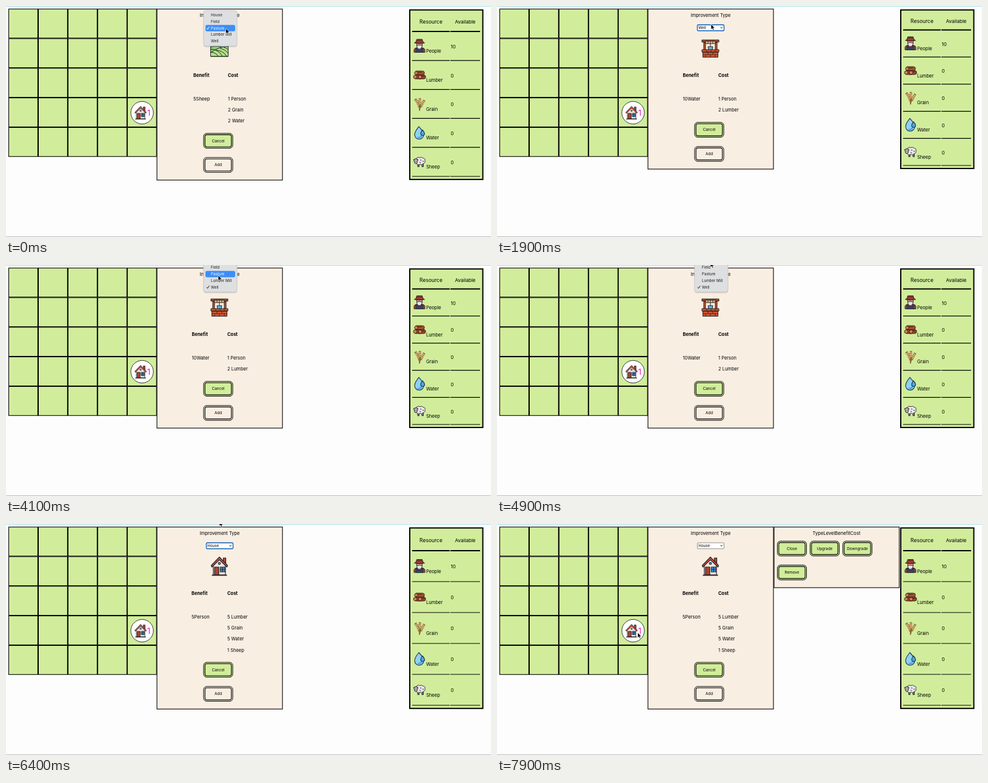
These frames come from a looping animation (800x381 px, 8000 ms). An HTML page:

```html
<!DOCTYPE html>
<html lang="en">
<head>
<meta charset="utf-8">
<title>Improvement picker</title>
<style>
  html, body { margin: 0; width: 100%; height: 100%; overflow: hidden; background: #fdfdfd; }
  svg { display: block; width: 100%; height: 100%; font-family: Inter, Roboto, sans-serif; }
</style>
</head>
<body>
<svg id="stage" viewBox="0 0 800 381">
  <defs>
    <g id="house" stroke="#23242c" stroke-width="1.200" stroke-linejoin="round">
      <path d="M6.500-14h4v10h-4z" fill="#b5483c"/>
      <path d="M-10 14V-2L0-12 10-2V14z" fill="#efe4dc"/>
      <path d="M-12.500 1-13.500-1.500 0-15.500 13.500-1.500 12.500 1 0-11z" fill="#d9503f"/>
      <path d="M-8 14V1h7V14z" fill="#a8452f"/>
      <path d="M1.500 1h7.500v8h-7.500zM5.200 1v8M1.500 5h7.500" fill="#3f9be0"/>
      <circle cy="-5" r="1.700" fill="#6bbdf0"/>
      <path d="M-12.500 14.500h25" stroke-width="1.800"/>
    </g>
    <g id="well" stroke="#2a2020" stroke-width="1" stroke-linejoin="round">
      <path d="M-11-10h3V4h-3zM8-10h3V4H8z" fill="#b5592f"/>
      <path d="M-14-14h28v3.500h-28z" fill="#a94b2b"/>
      <path d="M-8-12h16v4H-8z" fill="#efc88f"/>
      <path d="M-4-12v4M0-12V-2M4-12v4" fill="none"/>
      <path d="M-4-3h8L3 3h-6z" fill="#5fb3e6"/>
      <path d="M-14 2h28v4h-28zM-12.500 6h25v8.500h-25z" fill="#d4552f"/>
      <path d="M-12 10.200h24M-6 2v4M1 2v4M8 2v4M-4 6v4M4 6v4M-8 10v4M0 10v4M8 10v4" stroke-width=".8"/>
    </g>
    <g id="pasture" stroke="#1d2b1c" stroke-width="1" stroke-linejoin="round">
      <path d="M-14.500-13h29v26h-29z" fill="#bfe6f5"/>
      <path d="M-14.500-2Q-5-7 14.500 1V13h-29z" fill="#8fd07a"/>
      <path d="M-14.500 7Q0-4 14.500-3V13h-29z" fill="#b5e08a"/>
      <path d="M-14.500 1Q-1 2 5 13M-14.500 6Q-5 7-2 13M-6 3Q6 3 12 13M1 0Q9 1 14.500 8M7-2Q11-1 14.500 2" fill="none"/>
    </g>
    <g id="people" stroke="#26222a" stroke-width=".9" stroke-linejoin="round">
      <path d="M-9 10.500V6Q-8 3-4 3H4Q8 3 9 6V10.500z" fill="#b8403a"/>
      <path d="M-6 10.500V3.500h3V7h6V3.500h3v7z" fill="#33486e"/>
      <path d="M-4.500-5h9V0Q3 4 0 4T-4.500 0z" fill="#e9a88a"/>
      <path d="M-4.500-1Q0-2 4.500-1 4 4.500 0 5T-4.500-1z" fill="#e4e4ea"/>
      <path d="M-8.500-5Q-5-6-4.500-11H4.500Q5-6 8.500-5 0-2.500-8.500-5z" fill="#7a3328"/>
      <path d="M-4.500-6.800h9" stroke="#c4453c" stroke-width="1.300"/>
    </g>
    <g id="lumber" stroke="#3a2018" stroke-width=".9">
      <path d="M-6-6.500H5a3 3 0 0 1 0 6.500H-6z" fill="#a4502f"/>
      <path d="M-7 0H7a3 3 0 0 1 0 6.500H-7zM-1 0h3v6.500h-3zM-5-4.500h9M3 2h5" fill="#93452a"/>
      <g fill="#cf8252"><circle cx="-5.500" cy="-3.200" r="2.700"/><circle cx="-7" cy="3.300" r="2.900"/><circle cx="1" cy="3.300" r="2.900"/></g>
    </g>
    <g id="grain" fill="none">
      <path d="M0 11Q1 2-7-8M0 11Q0 0 1-10M0 11Q2 2 8-6" stroke="#7d5a34" stroke-width="1"/>
      <path d="M0 6Q-1 0-7-8M0 4Q0-3 1-10M2 5Q4 0 8-6" stroke="#8f6238" stroke-width="4.500" stroke-dasharray="1.600 1.200"/>
      <path d="M-1 3Q-3-2-6-6M0 1Q0-3 1-8M3 3Q4 0 7-4" stroke="#d9a062" stroke-width="1.600"/>
    </g>
    <g id="water" stroke="#1c3143" stroke-width="1.100">
      <path d="M-1-10.500Q-8-2-8 3A7.500 7.500 0 0 0 7 3Q7-2-1-10.500z" fill="#8fd0f5"/>
      <path d="M-4 7Q3 7 4 0 7 8-1 9.500z" fill="#4da6e2" stroke="none"/>
      <path d="M5-5Q2-1 2 1A3.200 3.200 0 0 0 8.500 1Q8-2 5-5z" fill="#4da6e2"/>
    </g>
    <g id="sheep" stroke="#2a2a30" stroke-width=".9">
      <path d="M-3 3v5h2.500V4M4 3v5h2.500V3" fill="#777"/>
      <path d="M-5-6Q-2-9 1-7 4-9 6-6 10-6 9-2 10 2 6 3 4 6 1 4-3 6-5 3-8 1-7-2-8-5-5-6z" fill="#eae6e8"/>
      <path d="M-9.500-4Q-6-6.500-2.500-4L-4 2Q-6 4-8 2z" fill="#b5abb0"/>
      <path d="M-10-3l2-1M-2-3l-2-1M-7-1v.6M-5-1v.6M1-3q2-1 2 1M5-1q2-1 2 1M0 1q2-1 2 1" fill="none"/>
    </g>
  </defs>
</svg>
<script>
const GREEN = '#d1ed9b', CREAM = '#f9eee2';
const stage = document.getElementById('stage');

const text = (x, y, str, size = 7.6, extra = '') =>
  `<text x="${x}" y="${y + size * 0.36}" font-size="${size}" ${extra}>${str}</text>`;
const centred = (x, y, str, size) => text(x, y, str, size, 'text-anchor="middle"');
const rect = (x, y, w, h, fill, stroke = 'none', line = 1, r = 0, extra = '') =>
  `<rect x="${x}" y="${y}" width="${w}" height="${h}" rx="${r}" fill="${fill}" stroke="${stroke}" stroke-width="${line}" ${extra}/>`;
const icon = (id, x, y, scale = 1) =>
  `<use href="#${id}" transform="translate(${x} ${y}) scale(${scale})"/>`;
const button = (x, y, label, fill = GREEN) =>
  rect(x - 24, y - 12.2, 48, 24.4, fill, '#000', 1, 5) +
  rect(x - 21.7, y - 9.9, 43.4, 19.8, fill, '#000', 1.1, 2.8) + centred(x, y, label, 6.3);
const range = n => [...Array(n).keys()];

function addGroup(markup) {
  const g = document.createElementNS('http://www.w3.org/2000/svg', 'g');
  g.innerHTML = markup;
  stage.append(g);
  return g;
}
const show = (g, on) => { g.style.display = on ? '' : 'none'; };

function resources(bottom, headLine, pitch) {
  const rule = (y, w) => `<path d="M670 ${y}h62M733 ${y}h49" stroke="#000" stroke-width="${w}"/>`;
  const rows = ['People', 'Lumber', 'Grain', 'Water', 'Sheep'].map((name, i) => {
    const mid = headLine + pitch * (i + 0.5);
    return icon(name.toLowerCase(), 682, mid) + text(693, mid + 8.4, name) +
      text(733.5, mid + 1, i ? 0 : 10, 8) + rule(headLine + pitch * (i + 1), 1.2);
  });
  const headY = headLine / 2 + 5;
  return rect(666, 6.5, 120.5, bottom - 7.5, GREEN, '#000', 2) + centred(701, headY, 'Resource', 8.5) +
    centred(757.5, headY, 'Available', 8.1) + rule(headLine, 1.8) + rows.join('');
}

function layout({ name, benefit, costs, left, right, headLine, pitch }) {
  const bottom = 233 + 18.1 * costs.length;
  const cancelY = 168 + 18.1 * costs.length;
  const bold = 'font-weight="700"';
  return rect(249, 5, 207, bottom - 5.2, CREAM, '#000', 1.1) +
    centred(352.5, 15.5, 'Improvement Type', 7.45) +
    icon(name.toLowerCase(), 352, 70) +
    text(left, 114.3, 'Benefit', 7.5, bold) + text(right, 114.3, 'Cost', 7.5, bold) +
    text(left, 153.5, benefit) +
    costs.map((c, i) => text(right, 153.5 + 18.1 * i, c, 7.5)).join('') +
    button(350, cancelY, 'Cancel') + button(350, cancelY + 39.8, 'Add', CREAM) +
    rect(330.5, 31, 44, 9.8, '#fff', '#777', 0.8, 1) + text(332.3, 36, name, 6.2) +
    '<path d="M368.500 34.800l1.700 1.900 1.700-1.900" fill="none" stroke="#222" stroke-width="1"/>' +
    resources(bottom - 0.2, headLine, pitch);
}

// Fixed scene: each cell has its own border, so inner lines are double
const cells = range(25).map(i =>
  rect(4.5 + (i % 5) * 48.95, 5 + Math.floor(i / 5) * 48.85, 47.95, 47.85, GREEN, '#000', 1.1)).join('');
addGroup(rect(0, 0, 800, 381, '#fdfdfd') + rect(0, 0, 800, 1, '#a9e2e8') + rect(0, 380, 800, 1, '#bbb') +
  cells + '<circle cx="224.500" cy="176" r="18.600" fill="#fff" stroke="#222" stroke-width=".9"/>' +
  icon('house', 222, 176.3, 0.7) + text(232.8, 176, '1', 13.5, 'fill="#f01ac8"'));

const layouts = [
  { name: 'Pasture', benefit: '5Sheep', costs: ['1 Person', '2 Grain', '2 Water'], left: 309, right: 366, headLine: 42, pitch: 47.8 },
  { name: 'Well', benefit: '10Water', costs: ['1 Person', '2 Lumber'], left: 306.5, right: 365, headLine: 39.5, pitch: 44.7 },
  { name: 'House', benefit: '5Person', costs: ['5 Lumber', '5 Grain', '5 Water', '1 Sheep'], left: 306, right: 365, headLine: 44, pitch: 51 },
].map(spec => addGroup(layout(spec)));

const focusRing = addGroup(rect(330.5, 31, 44, 9.8, 'none', '#1f6fc4', 1.5, 1.5));
const details = addGroup(rect(457, 5, 206.5, 100, CREAM, '#000', 1.1) +
  centred(560, 15.5, 'TypeLevelBenefitCost', 7.6) + button(486.5, 40.5, 'Close') +
  button(540.5, 40.5, 'Upgrade') + button(594.5, 40.5, 'Downgrade') + button(486.5, 80, 'Remove'));

// Drop-down menu
const STEP = 10.75, FIRST = 15;
const menu = addGroup(rect(325.8, 9, 55.4, 59, '#000', 'none', 0, 4, 'opacity=".12"') +
  rect(325.8, 7.5, 55.2, 58.5, '#dedfe1', '#bcbec2', 0.7, 3.5));
const bar = addGroup(rect(329, FIRST - 5.2, 49, 10.4, '#3d8ef8', 'none', 0, 2.5));
menu.append(bar);
const items = ['House', 'Field', 'Pasture', 'Lumber Mill', 'Well'].map((label, i) => {
  const y = FIRST + STEP * i;
  const g = addGroup(text(338, y, label, 6.2) +
    `<path class="tick" d="M331 ${y}l1.500 2 2.700-4.300" fill="none" stroke="currentColor" stroke-width="1"/>`);
  g.setAttribute('fill', 'currentColor');
  menu.append(g);
  return g;
});

const pointer = addGroup('<path d="M0 0V8.600L2 6.900 3.400 9.900 5 9.200 3.600 6.300H6.300z" fill="#000" stroke="#fff" stroke-width=".7"/>');

// Pointer tip: time, x, y
const path = [
  [0, 362.5, 37], [300, 362, 38], [900, 356, 56], [1200, 355, 57], [1600, 353, 30], [2000, 353, 30],
  [2400, 354, 36], [3500, 354, 36], [4100, 350, 17], [4700, 352, -5], [6400, 352, -5],
  [7100, 232, 179], [8000, 232, 179],
];

function pointerAt(t) {
  const i = path.findIndex(p => p[0] > t);
  const [t0, x0, y0] = path[i - 1], [t1, x1, y1] = path[i];
  const u = (t - t0) / (t1 - t0), e = u * u * (3 - 2 * u);
  return [x0 + (x1 - x0) * e, y0 + (y1 - y0) * e];
}

function draw(t) {
  const [x, y] = pointerAt(t);
  pointer.setAttribute('transform', `translate(${x} ${y})`);

  const current = t < 1300 ? 0 : t < 5600 ? 1 : 2;
  layouts.forEach((g, i) => show(g, i === current));
  show(focusRing, (t >= 1300 && t < 2200) || (t >= 5600 && t < 7300));
  show(details, t >= 7300);

  show(menu, t < 1200 || (t >= 2200 && t < 5400));
  const shift = t < 1200 ? 0 : -2 * STEP;
  const checked = t < 1200 ? 2 : 4;
  const hover = Math.max(0, Math.min(4, Math.round((y - shift - FIRST) / STEP)));
  menu.setAttribute('transform', `translate(0 ${shift})`);
  bar.setAttribute('transform', `translate(0 ${hover * STEP})`);
  items.forEach((g, i) => {
    g.style.color = i === hover ? '#fff' : '#1c1c1e';
    show(g.querySelector('.tick'), i === checked);
  });
}

function tick() {
  draw(Math.floor(performance.now() % 8000 / 100) * 100);
  requestAnimationFrame(tick);
}
tick();
</script>
</body>
</html>
```
